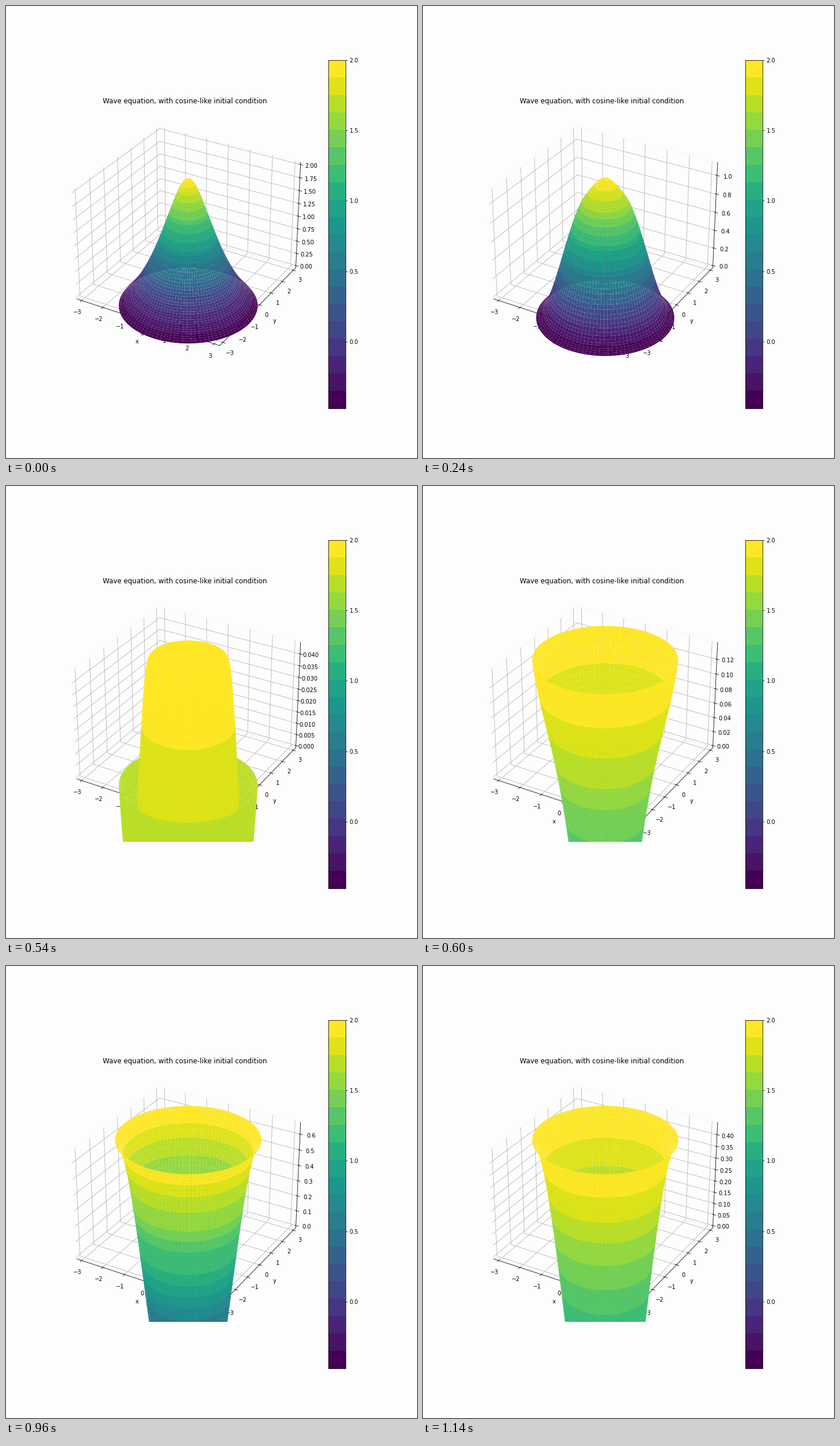
These frames come from a looping animation (714 by 785 pixels, 1.2 s). A matplotlib script:

```python
import numpy as np
import matplotlib.pyplot as plt
from matplotlib.animation import FuncAnimation
from matplotlib.cm import ScalarMappable
from matplotlib.colors import Normalize
from matplotlib.ticker import AutoLocator

WIDTH, HEIGHT, DPI = 714, 785, 71.4
FRAMES, INTERVAL = 20, 60
RADIUS = 2 * np.sqrt(2)
PAPER = "#fdfdfd"
PAD = 1 / 48
CMAP = plt.get_cmap("viridis", 20)

# Strength of the three wave parts at a few key times.
TIMES = np.array([0, 4, 7, 9, 12, 16, 19])
SWELL = np.array([-.3, -.38, -.28, -.098, .429, .661, .443])
CORE = np.array([1.43, .395, -.3, -.75, 0, -.05, -.95])
EDGE = np.array([-.174, -.027, .015, .088, 0, 0, 0])


def track(frame, values):
    """Smooth curve through the key values."""
    slopes = np.gradient(values, TIMES)
    i = min(np.searchsorted(TIMES, frame, side="right"), len(TIMES) - 1) - 1
    span = TIMES[i + 1] - TIMES[i]
    s = (frame - TIMES[i]) / span
    return ((1 + 2 * s) * (1 - s) ** 2 * values[i]
            + s * (1 - s) ** 2 * span * slopes[i]
            + s * s * (3 - 2 * s) * values[i + 1]
            + s * s * (s - 1) * span * slopes[i + 1])


def wave_profile(rho, frame):
    """Height by relative radius: broad swell, central bump and rim curl."""
    swell = 1 - 2.9 * np.sin(np.minimum(2.18 * (1 - rho), np.pi / 2)) ** 2
    core = np.exp(-(rho / .34) ** 2)
    return (track(frame, SWELL) * swell + track(frame, CORE) * core
            + track(frame, EDGE) * rho ** 10)


class InsideLocator(AutoLocator):
    """Automatic ticks that stay out of the axis padding."""

    def tick_values(self, vmin, vmax):
        pad = (vmax - vmin) / 50
        low, high = vmin + pad, vmax - pad
        ticks = super().tick_values(low, high)
        slack = pad / 100
        return ticks[(ticks >= low - slack) & (ticks <= high + slack)]


rho = np.linspace(0, 1, 51)
theta = np.linspace(0, 2 * np.pi, 101)
X = RADIUS * np.outer(rho, np.cos(theta))
Y = RADIUS * np.outer(rho, np.sin(theta))

plt.rcParams["font.family"] = "DejaVu Sans"
# The tiny excess guards the pixel size against rounding down.
fig = plt.figure(figsize=((WIDTH + 1e-6) / DPI, (HEIGHT + 1e-6) / DPI),
                 dpi=DPI, facecolor=PAPER)
ax = fig.add_subplot(projection="3d", facecolor=PAPER)
fig.colorbar(ScalarMappable(Normalize(-.475, 2), CMAP), ax=ax)
ax.set_title("Wave equation, with cosine-like initial condition")
ax.set_xlabel("x")
ax.set_ylabel("y")
limit = 1.1 * RADIUS * (1 + 2 * PAD)
ax.set_xlim(-limit, limit)
ax.set_ylim(-limit, limit)
ax.zaxis.set_major_locator(InsideLocator())
for axis in (ax.xaxis, ax.yaxis, ax.zaxis):
    axis.pane.set_facecolor(PAPER)
    axis.pane.set_edgecolor("#efefef")
surfaces = []


def update(frame):
    while surfaces:
        surfaces.pop().remove()
    heights = wave_profile(rho, frame)
    Z = np.repeat(heights[:, None], len(theta), axis=1)
    surfaces.append(ax.plot_surface(X, Y, Z, cmap=CMAP, rstride=1, cstride=1,
                                    linewidth=0, antialiased=True))
    peak = heights.max()
    ax.set_zlim(-peak * PAD, peak * (1 + PAD))
    return surfaces


anim = FuncAnimation(fig, update, frames=FRAMES, interval=INTERVAL,
                     init_func=lambda: update(0), repeat=True, repeat_delay=0)
plt.show()
```
